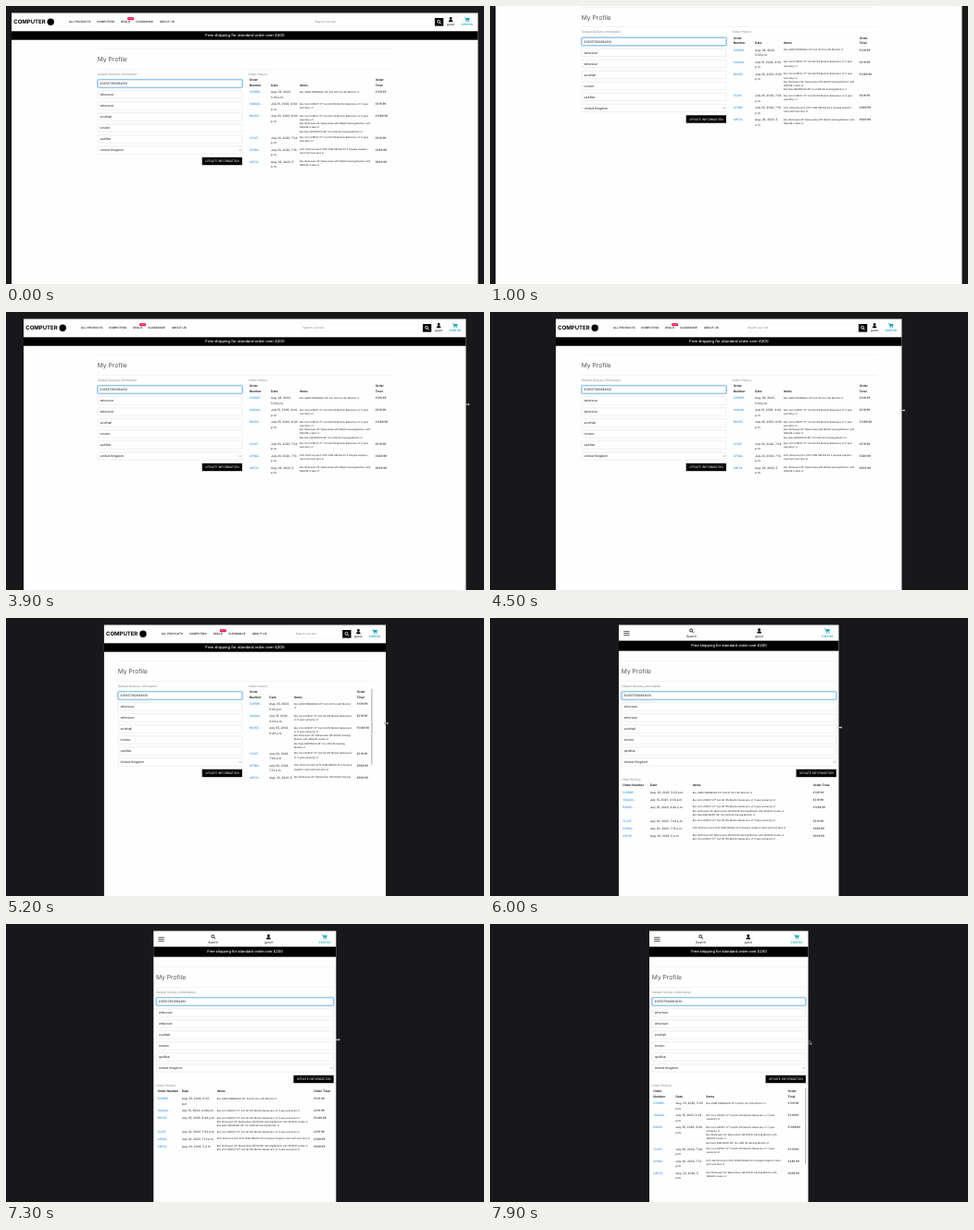
An HTML page that plays this animation: 516 by 301 pixels, repeating every 8000 ms.

```html
<!DOCTYPE html>
<html lang="en">
<head>
<meta charset="utf-8">
<title>Profile page</title>
<style>
html, body { margin: 0; width: 100%; height: 100%; overflow: hidden; background: #18171a; }
svg { display: block; width: 100vw; height: 100vh; font-family: Inter, sans-serif; font-optical-sizing: none; text-rendering: geometricPrecision; }
#probe { position: absolute; top: 0; visibility: hidden; }
</style>
</head>
<body>
<svg id="stage" viewBox="0 0 516 301"></svg>
<svg id="probe" viewBox="0 0 516 301"><text font-size="100"></text></svg>
<script>
const LOOP = 8000, STEP = 100, MID = 258;
const stage = document.getElementById('stage');
const probe = document.querySelector('#probe text');

// [time, value] pairs
const edgeKeys = [[3600, 6], [3700, 8], [3800, 12.5], [3900, 19], [4500, 71], [5200, 105.7],
  [5400, 115], [6300, 151], [6800, 154], [7200, 157], [7900, 172]];
const scrollKeys = [[400, 0], [500, 4], [600, 14], [700, 26], [800, 36], [900, 43], [1000, 45.5],
  [1300, 45.5], [1400, 44], [1600, 39], [1700, 39], [1800, 24], [1900, 8], [2000, 0]];
const cursorX = [[2400, 0], [2700, 1.5], [2800, 1.5], [3200, 3.5], [3600, 3.5], [3900, 2],
  [5200, 1], [6800, 2], [7900, 2.5]];
const cursorY = [[2400, 100], [3900, 100], [5200, 114], [6800, 123], [7900, 128]];

const flat = 'Box Vorn K3914T 27" Full HD IPS Monitor Bezel-less x1 (1 year warranty) x1';
const curved = 'Box Wolmaven 24" Mamondow W5 WQHD Gaming Monitor with 165GHR screen x1';
const orders = [
  ['523B9E...', 'Aug. 23, 2022, 5:03 p.m.', ['Box QWM 31MW650H 22" Full HD 1ms LED Monitor x1'], '£109.99'],
  ['1A844A...', 'July 15, 2022, 4:04 p.m.', [flat], '£219.99'],
  ['B60SE...', 'July 25, 2022, 6:43 p.m.', [flat, curved, 'Box Nulo RW4150XD 28" 1ms HDR 4K Gaming Monitor x1'], '£1089.96'],
  ['1C24F...', 'July 20, 2022, 7:04 p.m.', [flat], '£219.99'],
  ['AF68A...', 'July 20, 2022, 7:13 p.m.', ['KVO Zentroma QLX 4170 12GB DRIVAS 2X 2 Ampere Graphics Card with twin fans x1'], '£389.99'],
  ['A9F22...', 'Aug. 23, 2022, 5 p.m.', [curved, flat], '£669.99']
];
const fields = ['£05517392684610', 'wherever', 'wherever', 'southall', 'london', 'qz48xk', 'United Kingdom'];

function at(keys, t) {
  if (t <= keys[0][0]) return keys[0][1];
  for (let i = 1; i < keys.length; i++) {
    const [t0, a] = keys[i - 1], [t1, b] = keys[i];
    if (t <= t1) return a + (b - a) * (t - t0) / (t1 - t0);
  }
  return keys[keys.length - 1][1];
}

const rect = (x, y, w, h, fill, extra = '') =>
  `<rect x="${x}" y="${y}" width="${w}" height="${h}" fill="${fill}" ${extra}/>`;

// y is the middle of the capitals; type is set large and scaled down for exact spacing
const text = (x, y, s, size, fill, weight = 400, anchor = 'start') =>
  `<text transform="translate(${x} ${y + size * 0.36}) scale(${size / 100})" font-size="100" fill="${fill}" font-weight="${weight}" text-anchor="${anchor}">${s}</text>`;

const path = (d, stroke, w = 0.7, fill = 'none') =>
  `<path d="${d}" stroke="${stroke}" stroke-width="${w}" fill="${fill}"/>`;

const widths = new Map();
function measure(s, size, weight) {
  const key = weight + s;
  if (!widths.has(key)) {
    probe.setAttribute('font-weight', weight);
    probe.textContent = s;
    widths.set(key, probe.getComputedTextLength());
  }
  return widths.get(key) * size / 100;
}

function wrap(s, size, width, weight = 400) {
  const lines = [];
  let line = '';
  for (const word of s.split(/ |(?<=Bezel-)/)) {
    const next = line ? line + (line.endsWith('-') ? '' : ' ') + word : word;
    if (line && measure(next, size, weight) > width) {
      lines.push(line);
      line = word;
    } else line = next;
  }
  return lines.concat(line);
}

const lens = (x, y, c) =>
  `<circle cx="${x - 0.4}" cy="${y - 0.4}" r="1.5" fill="none" stroke="${c}" stroke-width=".8"/>` +
  path(`M${x + 0.7} ${y + 0.7}l1.6 1.6`, c, 0.9);

const person = (x, y) =>
  `<circle cx="${x}" cy="${y - 1.3}" r="1.4"/>` +
  path(`M${x - 2.4} ${y + 2.4}q0-2.2 2.4-2.2t2.4 2.2z`, 'none', 0, '#000');

const cart = (x, y) =>
  path(`M${x - 3} ${y - 2.2}h1.2l.9 3.4h3.6`, '#17a2b8', 0.6) +
  path(`M${x - 1.6} ${y - 1.6}h4.6l-.8 2.3h-3.2z`, 'none', 0, '#17a2b8') +
  `<g fill="#17a2b8"><circle cx="${x - 0.6}" cy="${y + 2.2}" r=".6"/><circle cx="${x + 2}" cy="${y + 2.2}" r=".6"/></g>`;

const promo = (y, size) =>
  text(MID, y, 'Free shipping for standard order over £200', size, '#fff', 500, 'middle');

function wideHeader(L, R) {
  const links = [['ALL PRODUCTS', 62], ['COMPUTING', 92], ['DEALS', 118], ['CLEARANCE', 134.3], ['ABOUT US', 160]];
  const box = Math.max(L + 205, R - 178);
  return text(L + 2.3, 17.2, 'COMPUTER', 5.95, '#000', 700) +
    `<circle cx="${L + 42.2}" cy="17.2" r="3.7"/>` +
    links.map(([s, x]) => text(L + x, 17.3, s, 3.05, '#111', 500)).join('') +
    rect(L + 125, 12, 7.2, 3.2, '#e8154f', 'rx="1.5"') +
    text(L + 128.6, 13.6, 'SALE', 1.9, '#fff', 600, 'middle') +
    rect(box, 13.2, R - 47 - box, 8.2, '#fff', 'stroke="#eee" stroke-width=".3"') +
    text(box + 2, 17.2, 'Search our site', 3.15, '#808080') +
    rect(R - 46.8, 13, 9.3, 8.6, '#000') + lens(R - 42.2, 17.2, '#fff') +
    person(R - 29.6, 14.8) + text(R - 29.6, 20.3, 'guest', 3.2, '#111', 400, 'middle') +
    cart(R - 12, 14.6) + text(R - 12, 20.3, '£399.98', 3.1, '#17a2b8', 500, 'middle') +
    rect(L, 27.3, R - L, 9.4, '#000') + promo(32, 4.15);
}

function slimHeader(L, R) {
  const w = R - L, find = L + w * 0.347 - 4, user = L + w * 0.68 - 10, bag = R - 12.7;
  return [14.7, 16.6, 18.5].map(y => rect(L + 5.2, y - 0.35, 6.4, 0.7, '#222')).join('') +
    lens(find, 13.8, '#000') + text(find, 19.4, 'Search', 3.3, '#111', 400, 'middle') +
    person(user, 14) + text(user, 19.4, 'guest', 3.3, '#111', 400, 'middle') +
    cart(bag, 13.8) + text(bag, 19.4, '£399.98', 3.1, '#17a2b8', 500, 'middle') +
    rect(L, 24.6, w, 11, '#000') + promo(30, 3.97);
}

function form(x, w) {
  let out = text(x, 73.5, 'Default Delivery Information', 3.2, '#808080');
  fields.forEach((s, i) => {
    const y = 84 + i * 12;
    if (!i) out += rect(x - 0.5, y - 4.7, w + 1, 9.4, 'none', 'rx="1" stroke="#c4dff9" stroke-width="1"');
    out += rect(x, y - 4.2, w, 8.4, '#fff', `rx=".8" stroke="${i ? '#d8dce0' : '#4f9fe0'}" stroke-width="${i ? 0.5 : 0.7}"`) +
      text(x + 2.6, y, s, 3.35, '#111');
  });
  return out + path(`M${x + w - 3} 155.6l.8.9.8-.9`, '#333', 0.5) +
    rect(x + w - 43.3, 163.8, 43.3, 8.4, '#000') +
    text(x + w - 21.6, 168.1, 'UPDATE INFORMATION', 3.3, '#fff', 400, 'middle');
}

function history(x, w, top, bar) {
  const d = w - 133, cols = [0, 21.5 + 0.08 * d, 48 + 0.277 * d, 115.5 + 0.91 * d].map(c => x + 1.2 + c);
  const size = 3.1, small = 2.52, bold = 3.3;
  const heads = ['Order Number', 'Date', 'Items', 'Order Total'].map((s, i) =>
    wrap(s, bold, (i < 3 ? cols[i + 1] : x + w) - cols[i] - 2, 600));
  const tall = heads.some(h => h.length > 1);
  let y = top + 4, out = '';
  heads.forEach((h, i) => {
    const first = tall && h.length < 2 ? y + 5.5 : y;
    h.forEach((s, k) => out += text(cols[i], first + k * 5.5, s, bold, '#111', 600));
  });
  y += tall ? 13 : 7.9;
  for (const [id, date, items, total] of orders) {
    const when = wrap(date, size, cols[2] - cols[1] - 2);
    const list = items.flatMap(s => wrap(s, small, cols[3] - cols[2] - 4));
    out += text(cols[0], y, id, size, '#1a85e8') + text(cols[3], y, total, size, '#222');
    when.forEach((s, k) => out += text(cols[1], y + k * 5.5, s, size, '#222'));
    list.forEach((s, k) => out += text(cols[2], y - 0.3 + k * 4.15, s, small, '#222'));
    y += Math.max(5.2 * when.length + 2.6, 4.15 * list.length + 2.6);
  }
  const thumb = bar && y - top > 103 ? rect(x + w - 0.6, top + 0.5, 1, 82, '#a8a8a8') : '';
  return `<clipPath id="rows">${rect(x - 1, top, w + 2, 99, '#000')}</clipPath>` +
    `<g clip-path="url(#rows)">${out}</g>` + thumb;
}

function cursor(t, R) {
  if (t < 2400) return '';
  const x = R + at(cursorX, t) - 0.5, y = at(cursorY, t);
  return t < 2700 || t >= 7600
    ? path(`M${x - 1} ${y - 2}v4.2l1-.9.7 1.5.7-.3-.7-1.5h1.4z`, '#eee', 0.4, '#000')
    : path(`M${x - 2.6} ${y}l1.7-1.4v.9h1.8v-.9l1.7 1.4-1.7 1.4v-.9h-1.8v.9z`, '#222', 0.2, '#ddd');
}

function draw(t) {
  const L = at(edgeKeys, t), R = 515.7 - L, w = R - L;
  const wide = w >= 243.5;
  const box = w >= 343.5 ? 324 : w >= 294.5 ? 280 : wide ? 235.6 : w;
  const x = MID - box / 2 + 3, inner = box - 6;
  const half = wide ? box / 2 - 6 : inner;
  const tx = wide ? MID + 3.6 : x, tw = wide ? half - 0.6 : inner;
  const rule = y => rect(x - 1, y, inner + 2, 0.4, '#e6e6e6');
  stage.innerHTML = rect(0, 0, 516, 301, '#18171a') +
    `<clipPath id="page">${rect(L, 0, w, 301, '#000')}</clipPath><g clip-path="url(#page)">` +
    `<g transform="translate(0 ${-at(scrollKeys, t)})">` +
    rect(L, 7.5, w, 400, '#fefefe') + (wide ? wideHeader(L, R) : slimHeader(L, R)) +
    rule(46.6) + text(x - 0.3, 58, 'My Profile', 6.7, '#555') + rule(68) +
    form(x, half) + text(tx, wide ? 73.5 : 175, 'Order History', 3.25, '#808080') +
    history(tx, tw, wide ? 76.3 : 177.3, t >= 4800) +
    '</g></g>' + cursor(t, R);
}

let last = -1;
function tick() {
  const t = Math.floor(performance.now() % LOOP / STEP) * STEP;
  if (t !== last) draw(last = t);
  requestAnimationFrame(tick);
}
tick();
</script>
</body>
</html>
```
